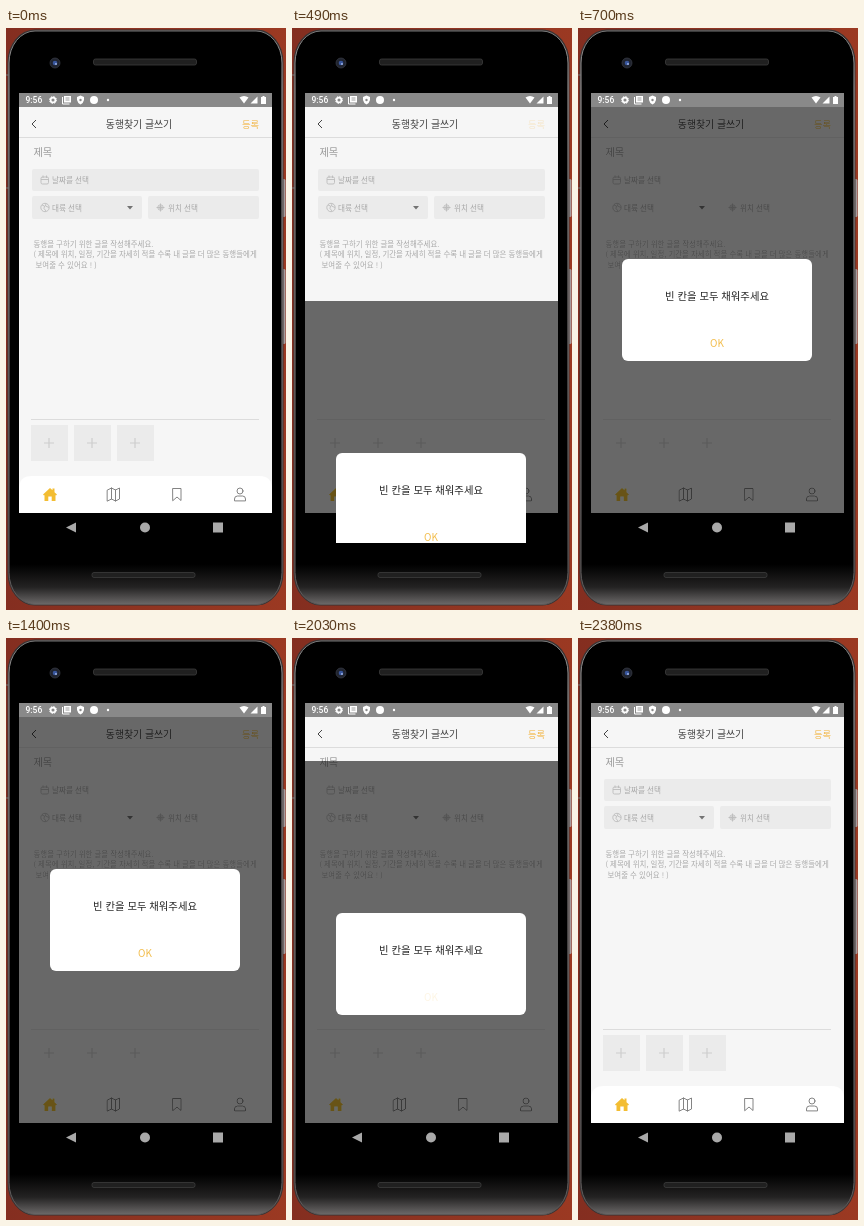
Animation, 280 px wide and 582 px high, one loop 3.15 s. Source, as an HTML page:

```html
<!DOCTYPE html>
<html lang="ko">
<head>
<meta charset="utf-8">
<title>동행찾기 글쓰기</title>
<style>
  html, body { margin: 0; width: 100%; height: 100%; overflow: hidden; background: #95361f; }
  svg { display: block; width: 100vw; height: 100vh; }
  text { font-family: "Noto Sans CJK KR", "Noto Sans KR", "Noto Sans", sans-serif; }
  .clock { font: 500 8.5px Roboto, sans-serif; }
  .hint { font-size: 7.45px; fill: #a8a8a8; }
  .label { font-size: 7.6px; fill: #a8a8a8; }
  .field { fill: #ebebeb; }
  .line { fill: none; stroke: #767676; stroke-width: .9; stroke-linecap: round; stroke-linejoin: round; }
  .soft { fill: none; stroke: #bdbdbd; stroke-width: .9; }
  .flatten { mix-blend-mode: darken; }
  .slide, .submit, .ok { animation: slide 3150ms step-end infinite; }
  .submit { animation-name: submit; }
  .ok { animation-name: ok; }

  /* 70 ms steps: decelerating entry, accelerating exit */
  @keyframes slide {
    0%      { transform: translateY(436px); }
    13.333% { transform: translateY(353px); }
    15.555% { transform: translateY(194px); }
    17.777% { transform: translateY(82px); }
    20%     { transform: translateY(17px); }
    22.222% { transform: translateY(0); }
    64.444% { transform: translateY(44px); }
    66.666% { transform: translateY(263px); }
    68.888%, 100% { transform: translateY(436px); }
  }
  @keyframes submit {
    0% { opacity: 1; }
    8.888% { opacity: .25; }
    17.777%, 100% { opacity: 1; }
  }
  @keyframes ok {
    0% { opacity: 1; }
    60% { opacity: .15; }
    68.888%, 100% { opacity: 1; }
  }
</style>
</head>
<body>
<svg viewBox="0 0 280 582" preserveAspectRatio="none">
  <defs>
    <clipPath id="screen"><rect x="13" y="79" width="253" height="406"/></clipPath>
    <clipPath id="window"><rect x="13" y="79" width="253" height="436"/></clipPath>
    <linearGradient id="wall">
      <stop offset="0" stop-color="#842e20"/>
      <stop offset="1" stop-color="#9b3922"/>
    </linearGradient>
    <linearGradient id="body" x2="0" y2="1">
      <stop offset=".93" stop-color="#000"/>
      <stop offset=".97" stop-color="#242323"/>
      <stop offset="1" stop-color="#6c6969"/>
    </linearGradient>
    <linearGradient id="rim" x2="0" y2="1">
      <stop offset="0" stop-color="#777"/>
      <stop offset=".1" stop-color="#aaa5a5"/>
      <stop offset=".5" stop-color="#8c8686"/>
      <stop offset="1" stop-color="#5c5858"/>
    </linearGradient>
    <g id="tile">
      <rect class="field" width="37" height="36"/>
      <path d="M13 18H23M18 13V23" stroke="#cecece" stroke-width="1.2"/>
    </g>
  </defs>

  <!-- phone -->
  <rect width="280" height="582" fill="url(#wall)"/>
  <g fill="#a79c9d">
    <rect x="275" y="151" width="4.5" height="38" rx="1.5"/>
    <rect x="275" y="241" width="4.5" height="75" rx="1.5"/>
  </g>
  <rect x="1.5" y="1.5" width="276" height="576" rx="27" ry="33" fill="#383333"/>
  <rect x="3" y="3" width="273" height="573.5" rx="26" ry="32" fill="url(#body)" stroke="url(#rim)"/>
  <path d="M0 47H3M0 160H3" stroke="#777"/>
  <g fill="#202020" stroke="#3d3d3d" stroke-width=".8">
    <rect x="87.5" y="31" width="103" height="6" rx="2"/>
    <rect x="86" y="544.5" width="103" height="5" rx="2"/>
  </g>
  <circle cx="49" cy="35" r="5" fill="#20242f" stroke="#3b3e48" stroke-width=".7"/>
  <circle cx="49" cy="35" r="2.3" fill="#38569d"/>
  <circle cx="50" cy="36" r=".9" fill="#a9bdec"/>

  <!-- status bar -->
  <rect x="13" y="65" width="253" height="14" fill="#898989"/>
  <g fill="#fff">
    <text class="clock" x="19.5" y="75">9:56</text>
    <circle cx="47" cy="72" r="2.4" fill="none" stroke="#fff" stroke-width="1.7"/>
    <circle cx="47" cy="72" r="3.5" fill="none" stroke="#fff" stroke-dasharray="1.4 1.35"/>
    <path d="M56.5 69V76H63.5" fill="none" stroke="#fff"/>
    <path d="M58 68H65V74.5H58Z"/>
    <path d="M59.5 70H63.5M59.5 72H63.5" stroke="#898989" stroke-width=".8"/>
    <path d="M74.5 67.5L78 69V72Q77.5 75 74.5 76.5Q71.5 75 71 72V69Z"/>
    <circle cx="74.5" cy="72" r="1.2" fill="#898989"/>
    <circle cx="88" cy="72" r="4"/>
    <circle cx="102" cy="72" r="1.2"/>
    <path d="M233.5 69.5Q238 66.5 242.5 69.5L238 75.5Z"/>
    <path d="M244.5 75.5L251.5 68.5V75.5Z"/>
    <path d="M255 69H256.5V68H258.5V69H260V76H255Z"/>
  </g>

  <!-- form -->
  <rect x="13" y="79" width="253" height="406" fill="#f6f6f6"/>
  <path d="M13 109.5H266" stroke="#dcdcdc"/>
  <path d="M30 92L26 96L30 100" fill="none" stroke="#444"/>
  <text x="133" y="99.7" font-size="9.9" fill="#404040" text-anchor="middle">동행찾기 글쓰기</text>
  <text class="submit" x="236" y="99.6" font-size="9.3" fill="#f2b94e">등록</text>
  <text x="27.5" y="128" font-size="10.2" fill="#999">제목</text>

  <g class="field">
    <rect x="26" y="141" width="227" height="22" rx="2"/>
    <rect x="26" y="168" width="110" height="23" rx="2"/>
    <rect x="142" y="168" width="111" height="23" rx="2"/>
  </g>
  <g class="label">
    <text x="46" y="155">날짜를 선택</text>
    <text x="46" y="182.5">대륙 선택</text>
    <text x="162" y="182.5">위치 선택</text>
  </g>
  <g class="soft">
    <rect x="35" y="149" width="7.5" height="7" rx="1.5"/>
    <path d="M35 151.5H42.5M37 147.5V150M40.5 147.5V150"/>
    <circle cx="39" cy="179.5" r="4.2"/>
    <path d="M36 177L38.5 178L38 180.5L40 183M40 175.5L39.5 178L43 179.5"/>
    <circle cx="154.5" cy="179.5" r="2.7"/>
    <path d="M154.5 175.5V183.5M150.5 179.5H158.5"/>
  </g>
  <circle cx="154.5" cy="179.5" r="1.5" fill="#bcbcbc"/>
  <path d="M121 178H127L124 181.5Z" fill="#737373"/>

  <g class="hint">
    <text x="27.5" y="218.5">동행을 구하기 위한 글을 작성해주세요.</text>
    <text x="27.5" y="229">( 제목에 위치, 일정, 기간을 자세히 적을 수록 내 글을 더 많은 동행들에게</text>
    <text x="29.5" y="239.7">보여줄 수 있어요 ! )</text>
  </g>

  <path d="M25 391.5H253" stroke="#dcdcdc"/>
  <use href="#tile" x="25" y="397"/>
  <use href="#tile" x="68" y="397"/>
  <use href="#tile" x="111" y="397"/>

  <!-- tab bar -->
  <path d="M13 485V461Q13 448 26 448H253Q266 448 266 461V485Z" fill="#fff"/>
  <path d="M37 466.5L44 460L46.5 462.3V460.5H48.5V464.2L51 466.5L50 467.5L49.5 467V473H45.7V468.5H42.3V473H38.5V467L38 467.5Z" fill="#f3bd32"/>
  <g class="line">
    <path d="M101.5 462L105.5 460L109.5 462L113.5 460V471L109.5 473L105.5 471L101.5 473ZM105.5 460V471M109.5 462V473"/>
    <path d="M167 460.5H175V472.5L171 469L167 472.5Z"/>
    <circle cx="234" cy="463" r="3"/>
    <path d="M228.5 472.5V471Q228.5 468 231.5 468H236.5Q239.5 468 239.5 471V472.5Z"/>
  </g>

  <!-- backdrop: level the pale surfaces, then dim -->
  <g class="flatten" clip-path="url(#screen)">
    <rect class="slide" x="13" y="79" width="253" height="436" fill="#ebebeb"/>
  </g>
  <g clip-path="url(#screen)">
    <rect class="slide" x="13" y="79" width="253" height="436" fill-opacity=".555"/>
  </g>
  <g fill="#a9a9a9">
    <path d="M60 499.5L70 494.5V504.5Z"/>
    <circle cx="139" cy="499.5" r="5"/>
    <rect x="207" y="494.5" width="10" height="10"/>
  </g>

  <!-- dialog -->
  <g clip-path="url(#window)">
    <g class="slide" text-anchor="middle">
      <rect x="44" y="231" width="190" height="102" rx="6" fill="#fff"/>
      <text x="139" y="272" font-size="10.35" font-weight="500" fill="#222">빈 칸을 모두 채워주세요</text>
      <text class="ok" x="139" y="318.7" font-size="10" fill="#f2bd4c">OK</text>
    </g>
  </g>
</svg>
</body>
</html>
```
